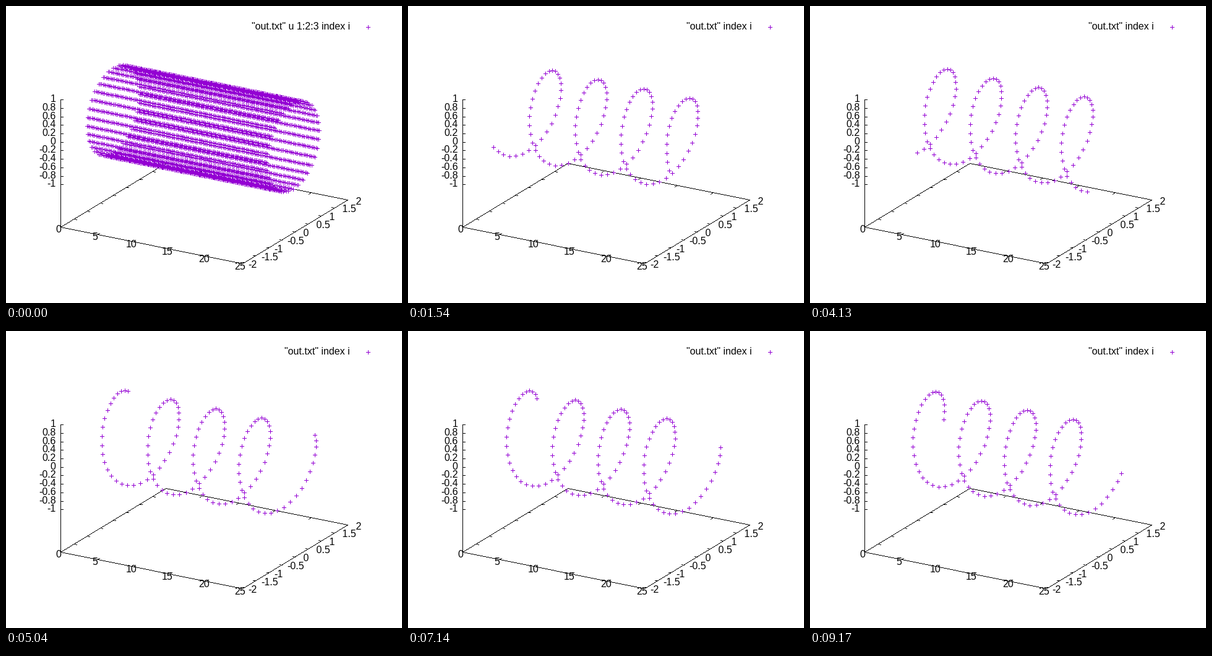
Animation of 640 by 480 pixels, one loop 9.24 s. Source, as a matplotlib script:

```python
import numpy as np
import matplotlib.pyplot as plt
from matplotlib.animation import FuncAnimation
from matplotlib.collections import PolyCollection

W, H, DPI = 640, 480, 100
FONT_PX = 16
PURPLE = "#9400D3"
STEP = 2 * np.pi / 32
POINTS, FRAMES, INTERVAL = 127, 132, 70
SCALE_X, SCALE_Y = 339, 237.5      # box size on the stage
COS, SIN = np.cos(np.pi / 6), 0.5  # turn of 30 degrees, tilt of 60

plt.rcParams["font.family"] = "Liberation Sans"
plt.rcParams["text.hinting"] = "default"
fig = plt.figure(figsize=(W / DPI, H / DPI), dpi=DPI, facecolor="white")
ax = fig.add_axes([0, 0, 1, 1])
ax.set_xlim(0, W)
ax.set_ylim(H, 0)
ax.axis("off")


def project(x, y, z):
    """Data coordinates to stage pixels."""
    u, v, w = x / 25, (y + 2) / 4, (z + 2) / 3
    px = 88.5 + SCALE_X * (COS * u + SIN * v)
    py = 356.8 + SCALE_Y * (SIN * SIN * u - COS * SIN * v - COS * w)
    return px, py


def floor_point(x, y):
    return project(x, y, -2)


def stamp(px, py, shape):
    """Copies of a small outline placed on whole pixels."""
    spots = np.round(np.column_stack([np.ravel(px), np.ravel(py)]))
    return spots[:, None, :] + np.array(shape)[None, :, :]


def add_pixels(verts, color, zorder):
    art = PolyCollection(verts, facecolor=color, lw=0, zorder=zorder)
    ax.add_collection(art, autolim=False)
    return art


PIXEL = [(0, 0), (1, 0), (1, 1), (0, 1)]
PLUS = [(-3, 0), (0, 0), (0, -3), (1, -3), (1, 0), (4, 0),
        (4, 1), (1, 1), (1, 4), (0, 4), (0, 1), (-3, 1)]


def line(p, q):
    """One pixel wide stepped line."""
    p, q = np.round(p), np.round(q)
    n = int(np.abs(q - p).max()) + 1
    add_pixels(stamp(np.linspace(p[0], q[0], n), np.linspace(p[1], q[1], n), PIXEL),
               "black", 1)


def tick(p, toward, length=4):
    p = np.array(p)
    d = np.array(toward) - p
    line(p, p + d / np.hypot(*d) * length)


def advance(s):
    return FONT_PX * sum({".": 0.278, "-": 0.333}.get(c, 0.556) for c in s)


def label(x, y, s, ha="left"):
    return ax.text(x, round(y), s, ha=ha, va="baseline",
                   fontsize=FONT_PX * 72 / DPI, color="black", zorder=3)


def add_axes_box():
    corners = [floor_point(*c) for c in ((0, -2), (25, -2), (25, 2), (0, 2))]
    for a, b in zip(corners, corners[1:] + corners[:1]):
        line(a, b)
    line(corners[0], project(0, -2, 1))

    for x in range(0, 26, 5):
        near, far = floor_point(x, -2), floor_point(x, 2)
        if 0 < x < 25:
            tick(near, far)
            tick(far, near)
        s = f"{x}"
        label(near[0] - 3.7 - advance(s) / 2, near[1] + 9.5, s)

    for y in np.arange(-4, 5) / 2:
        left, right = floor_point(0, y), floor_point(25, y)
        if abs(y) < 2:
            tick(left, right)
            tick(right, left)
        label(right[0] + 9, right[1] + 7.2, f"{y: g}")

    for z in np.arange(-5, 6) / 5:
        px, py = project(0, -2, z)
        line((px, py), (px + 4, py))
        s = f"{z:g}"
        label(80.5 - advance(s), py + 4, s)


def helix(phase):
    i = np.arange(POINTS)
    angle = (i + phase) * STEP
    return np.broadcast_arrays(*project(i * STEP, np.cos(angle), np.sin(angle)))


add_axes_box()
key = label(556, 38, "", "right")
add_pixels(stamp(585, 34, PLUS), PURPLE, 2)
marks = add_pixels([], PURPLE, 2)


def update(n):
    if n < 2:
        # every phase at once fills the cylinder
        points = helix(np.arange(32)[:, None])
        key.set_text('"out.txt" u 1:2:3 index i')
    else:
        points = helix(n - 3)
        key.set_text('"out.txt" index i')
    marks.set_verts(stamp(*points, PLUS))
    return marks, key


anim = FuncAnimation(fig, update, frames=FRAMES, interval=INTERVAL,
                     repeat=True, repeat_delay=0, blit=False)
plt.show()
```
